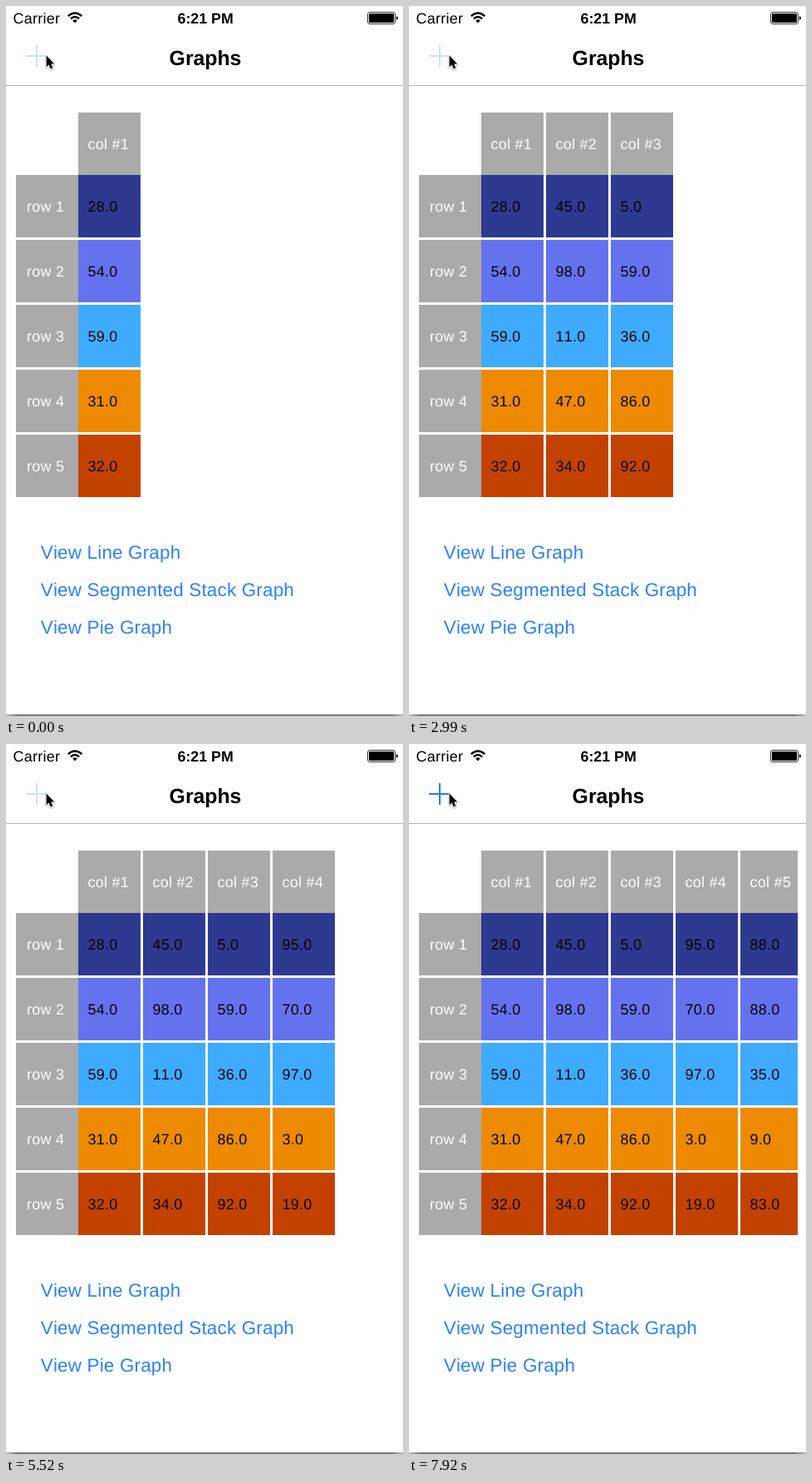
An HTML page that plays this animation: 478 by 853 pixels, repeating every 8 s.

```html
<!DOCTYPE html>
<html lang="en">
<head>
<meta charset="utf-8">
<title>Graphs</title>
<style>
  html, body { margin: 0; width: 100%; height: 100%; overflow: hidden; background: #fefefe; }
  svg { display: block; width: 100%; height: 100%; }
  text {
    font-family: "Liberation Sans", Arial, sans-serif;
    font-kerning: none;
    text-rendering: geometricPrecision;
    white-space: pre;
  }
  .small { font-size: 17.9px; letter-spacing: .3px; }
  .link { font-size: 22.4px; letter-spacing: .2px; fill: #2b80fc; }
  .bold { font-weight: bold; }
</style>
</head>
<body>
<svg viewBox="0 0 478 853">
  <defs>
    <clipPath id="view"><rect x="12" y="128" width="456" height="462"/></clipPath>
    <linearGradient id="edge">
      <stop offset="0" stop-color="#bbb"/>
      <stop offset=".03" stop-color="#777"/>
      <stop offset=".97" stop-color="#777"/>
      <stop offset="1" stop-color="#bbb"/>
    </linearGradient>
  </defs>
  <rect width="478" height="853" fill="#fefefe"/>

  <text class="small" x="8.5" y="20.8">Carrier</text>
  <g fill="none" stroke="#000" stroke-width="2.4">
    <path d="M74.8 12.2Q83 4.6 91.2 12.2"/>
    <path d="M77.9 15.4Q83 10.7 88.1 15.4"/>
  </g>
  <path d="M80.2 17.4Q83 15 85.8 17.4L83 20.4Z"/>
  <text class="bold" x="206.5" y="20.8" font-size="17.8">6:21 PM</text>
  <rect x="435.5" y="7.5" width="33" height="14" rx="2.5" fill="none" stroke="#333"/>
  <rect x="437" y="9" width="30" height="11" rx="1.2"/>
  <path d="M469.8 12.2Q472 12.5 472 14.5T469.8 16.8Z"/>

  <text class="bold" x="196.6" y="71" font-size="24.8">Graphs</text>
  <rect y="95" width="478" height="1" fill="#b4b4b6"/>
  <path id="plus" d="M24 60H50M37 47V73" stroke="#1f80f8" stroke-width="2"/>
  <path d="M48.6 59.6V73.2L51.6 70.5L53.8 75.6L56.3 74.5L54.2 69.6H58.2Z"
        stroke="#fff" stroke-width="1.6" paint-order="stroke" stroke-linejoin="round"
        style="filter: drop-shadow(0 1px 1px rgba(0, 0, 0, .35))"/>

  <g id="grid" clip-path="url(#view)"></g>

  <text class="link" x="41.8" y="664.2">View Line Graph</text>
  <text class="link" x="41.8" y="709.2">View Segmented Stack Graph</text>
  <text class="link" x="41.8" y="754.2">View Pie Graph</text>
  <rect y="851" width="478" height="2" fill="url(#edge)"/>
</svg>
<script>
  const LOOP = 8000, SIZE = 75, STEP = 78, GREY = '#aaaaaa';
  const rowColors = ['#2d3a90', '#6572ee', '#3eabff', '#ed8a00', '#c34200'];
  const columns = [
    { at: 0, values: [28, 54, 59, 31, 32] },
    { at: 150, values: [45, 98, 11, 47, 34] },
    { at: 2990, values: [5, 59, 36, 86, 92] },
    { at: 4330, values: [95, 70, 97, 3, 19] },
    { at: 5670, values: [88, 88, 35, 9, 83] }
  ];
  // [start ms, plus opacity]: dims on a press, then fades back
  const plusSteps = [
    [0, .22], [150, .4], [290, .85], [440, 1],
    [2840, .22], [3130, .65], [3280, 1],
    [4180, .22], [4480, .65], [4620, 1],
    [5520, .22], [5670, .4], [5820, .85], [5970, 1],
    [6570, .22], [6720, .65], [6870, 1],
    [7470, .22], [7770, .65], [7920, 1]
  ];

  const grid = document.getElementById('grid');
  const plus = document.getElementById('plus');

  function add(parent, tag, attrs, text) {
    const el = document.createElementNS('http://www.w3.org/2000/svg', tag);
    for (const key in attrs) el.setAttribute(key, attrs[key]);
    if (text) el.textContent = text;
    return parent.appendChild(el);
  }

  function cell(parent, x, y, fill, label, color, inset) {
    add(parent, 'rect', { x, y, width: SIZE, height: SIZE, fill });
    add(parent, 'text', { class: 'small', x: x + inset, y: y + 44.3, fill: color }, label);
  }

  rowColors.forEach((_, r) => cell(grid, 12, 203 + r * STEP, GREY, 'row ' + (r + 1), '#fff', 13));
  columns.forEach((col, c) => {
    const x = 87 + c * STEP;
    col.el = add(grid, 'g', {});
    cell(col.el, x, 128, GREY, 'col #' + (c + 1), '#fff', 11.4);
    col.values.forEach((v, r) =>
      cell(col.el, x, 203 + r * STEP, rowColors[r], v.toFixed(1), '#000', 11.4));
  });

  function draw(t) {
    for (const col of columns) col.el.setAttribute('visibility', t >= col.at ? 'visible' : 'hidden');
    const step = plusSteps.filter(s => s[0] <= t).pop();
    plus.setAttribute('opacity', step[1]);
  }

  const start = performance.now();
  function tick() {
    draw((performance.now() - start) % LOOP);
    requestAnimationFrame(tick);
  }
  tick();
</script>
</body>
</html>
```
